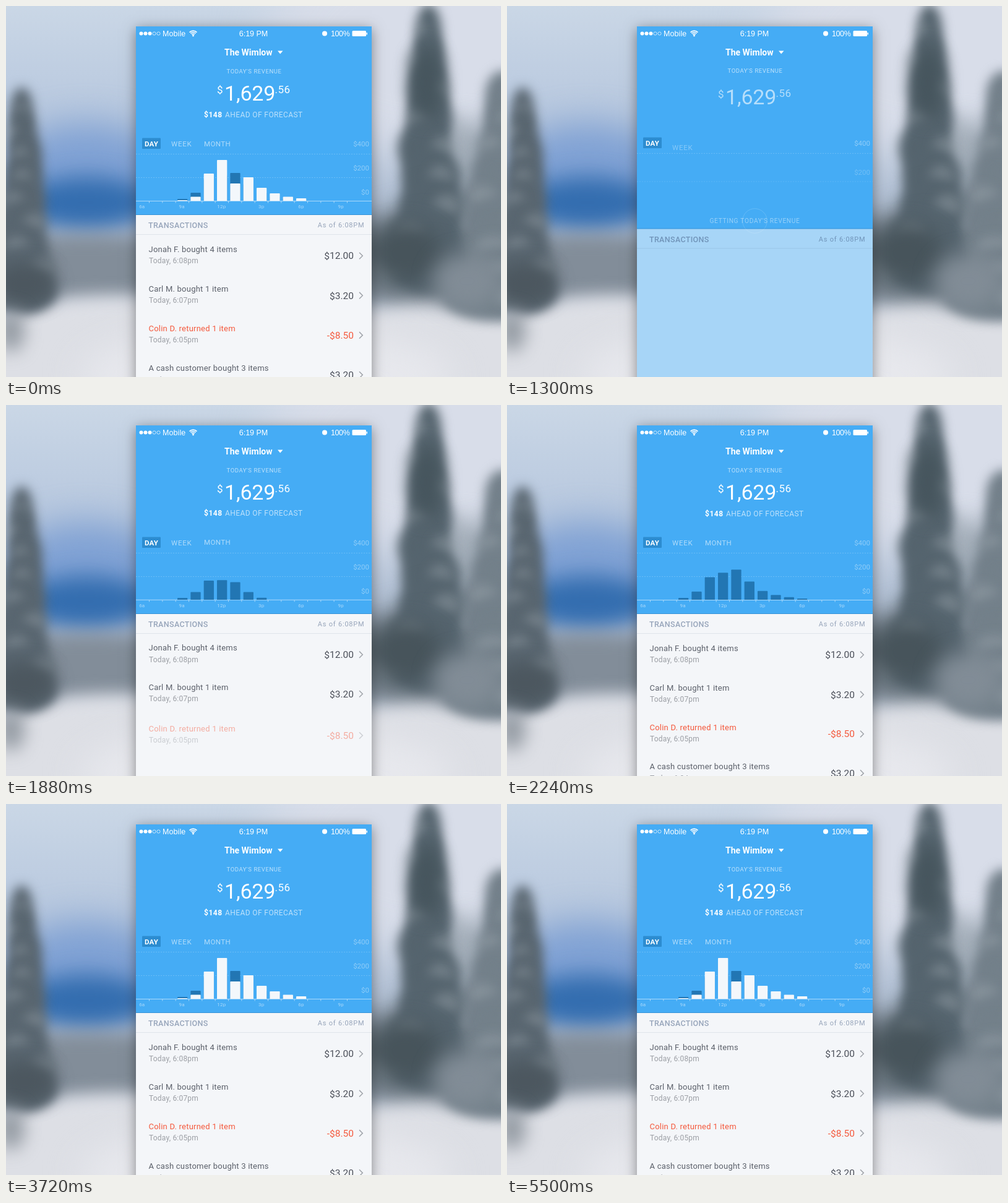
An HTML page with a canvas that plays this animation: 800x600 px, repeating every 5520 ms.

```html
<!DOCTYPE html>
<html lang="en">
<head>
<meta charset="utf-8">
<title>Revenue dashboard</title>
<style>
  html, body { margin: 0; width: 100%; height: 100%; overflow: hidden; background: #dfe2e8; }
  canvas { display: block; width: 800px; height: 600px; }
</style>
</head>
<body>
<canvas id="stage" width="800" height="600"></canvas>
<script>
const LOOP = 5520;
const BLUE = '#45acf5';
const SANS = 'Roboto, "Open Sans", sans-serif';
const SYSTEM = '"Liberation Sans", Arial, sans-serif';
const PHONE = { x: 210, y: 33, w: 381, h: 567, right: 591 };
const ctx = document.getElementById('stage').getContext('2d');

const clamp = v => Math.max(0, Math.min(1, v));
const span = (t, start, dur) => clamp((t - start) / dur);
const easeInOut = p => p * p * (3 - 2 * p);
const white = a => `rgba(255,255,255,${a})`;
function backOut(p) {
  const q = p - 1;
  return 1 + 2.7 * q * q * q + 1.7 * q * q;
}
function random(seed) {
  return () => (seed = (seed * 16807) % 2147483647) / 2147483647;
}

// Text centred vertically on y by its capital height.
function text(str, x, y, size, color, opt = {}) {
  const { weight = 400, gap = 0, align = 'left', font = SANS } = opt;
  ctx.font = `${weight} ${size}px ${font}`;
  ctx.letterSpacing = gap + 'px';
  ctx.textAlign = align;
  ctx.fillStyle = color;
  ctx.fillText(str, x, y + size * 0.355);
}

function rule(y, color, dash = []) {
  ctx.strokeStyle = color;
  ctx.lineWidth = 1;
  ctx.setLineDash(dash);
  ctx.beginPath();
  ctx.moveTo(PHONE.x, y);
  ctx.lineTo(PHONE.right, y);
  ctx.stroke();
  ctx.setLineDash([]);
}

function dot(x, y, r) {
  ctx.beginPath();
  ctx.arc(x, y, r, 0, 7);
}

function box(x, y, w, h, r) {
  ctx.beginPath();
  ctx.roundRect(x, y, w, h, r);
  ctx.fill();
}

// Springs a group up from below while it fades in.
function rise(t, start, dist, draw, fade = 3.2) {
  const p = span(t, start, 600);
  if (p <= 0) return;
  ctx.save();
  ctx.globalAlpha = clamp(p * fade);
  ctx.translate(0, dist * (1 - backOut(p)));
  draw();
  ctx.restore();
}

function makeScene() {
  const c = document.createElement('canvas');
  c.width = 800;
  c.height = 600;
  const g = c.getContext('2d');
  const rnd = random(11);

  const blob = (x, y, rx, ry, color, blur, alpha = 1) => {
    g.filter = `blur(${blur}px)`;
    g.globalAlpha = alpha;
    g.fillStyle = color;
    g.beginPath();
    g.ellipse(x, y, rx, ry, 0, 0, 7);
    g.fill();
  };
  // Tiers widen towards the base; pale flecks stand for snow on the branches.
  const fir = (x, top, base, half, color) => {
    const tiers = 9, step = (base - top) / tiers;
    for (let i = 0; i < tiers; i++) {
      const w = half * (0.3 + 0.7 * i / tiers);
      const y = top + step * (i + 0.5);
      blob(x + (rnd() - 0.5) * w * 0.3, y, w, step, color, 9);
      blob(x + (rnd() - 0.5) * w * 2, y, w * 0.4, step * 0.4, '#a3adb5', 9, 0.4);
    }
  };

  const sky = g.createLinearGradient(0, 0, 0, 460);
  sky.addColorStop(0, '#cad7e6');
  sky.addColorStop(0.35, '#b9c9df');
  sky.addColorStop(1, '#a9b6c8');
  g.fillStyle = sky;
  g.fillRect(0, 0, 800, 600);
  blob(680, 60, 260, 190, '#d8dde9', 40);
  blob(130, 270, 130, 80, '#7fa1d4', 28);
  blob(130, 318, 105, 42, '#336daf', 18);

  // Far woods, then snow that slopes down to the right
  blob(130, 425, 190, 55, '#828d99', 14);
  blob(690, 410, 150, 90, '#737f89', 18);
  blob(740, 290, 50, 110, '#98a3ad', 18, 0.8);
  blob(170, 640, 300, 172, '#dddfe5', 14);
  blob(690, 660, 330, 178, '#dddfe5', 14);
  blob(420, 600, 300, 80, '#e7e8ed', 28);

  fir(28, 150, 480, 60, '#596670');
  blob(30, 450, 50, 34, '#4c575f', 14);
  blob(8, 525, 22, 34, '#949ba3', 14);
  fir(805, 125, 490, 95, '#73808a');
  fir(680, 20, 440, 70, '#55646e');
  blob(680, 125, 26, 60, '#46555d', 14);
  blob(645, 400, 60, 48, '#47545b', 16);
  blob(745, 445, 55, 45, '#818c96', 16);

  g.filter = 'none';
  g.globalAlpha = 1;
  g.shadowColor = 'rgba(0,0,0,.42)';
  g.shadowBlur = 20;
  g.shadowOffsetY = 4;
  g.fillStyle = BLUE;
  g.fillRect(PHONE.x, PHONE.y, PHONE.w, PHONE.h + 50);
  return c;
}

function statusBar() {
  ctx.fillStyle = ctx.strokeStyle = '#fff';
  ctx.lineWidth = 0.7;
  for (let i = 0; i < 5; i++) {
    dot(218.5 + i * 7, 44.5, i < 3 ? 3 : 2.6);
    i < 3 ? ctx.fill() : ctx.stroke();
  }
  ctx.lineWidth = 1.6;
  for (let r = 3.2; r < 9; r += 2.6) {
    ctx.beginPath();
    ctx.arc(302.5, 48.5, r, -Math.PI * 0.75, -Math.PI * 0.25);
    ctx.stroke();
  }
  dot(302.5, 48, 1.4);
  ctx.fill();
  dot(515, 44.5, 4);
  ctx.fill();
  box(559.5, 40, 22.5, 9, 1.5);
  ctx.fillRect(582.5, 43, 1.5, 3.5);
  text('Mobile', 253, 44.7, 12.5, '#fff', { font: SYSTEM, gap: 0.1 });
  text('6:19 PM', 400, 44.7, 12.5, '#fff', { font: SYSTEM, align: 'center' });
  text('100%', 525, 44.7, 12.5, '#fff', { font: SYSTEM, gap: -0.4 });
}

function loader(t) {
  const out = easeInOut(span(t, 1130, 320));
  if (out >= 1) return;
  const scale = 1 - 0.2 * out;
  ctx.save();
  ctx.translate(400.5, 347.5);
  ctx.scale(scale, scale);
  ctx.globalAlpha = span(t, 40, 320) * (1 - out);
  text("GETTING TODAY'S REVENUE", 0, 0, 11.5, '#fff', { gap: 0.72, align: 'center' });
  ctx.globalAlpha = 0.5 * (1 - out);
  ctx.strokeStyle = '#d5f0ff';
  ctx.lineWidth = 1;
  ctx.beginPath();
  ctx.arc(0, 0, 22.3, -Math.PI / 2, (span(t, 200, 740) * 2 - 0.5) * Math.PI);
  ctx.stroke();
  ctx.restore();
}

// The three waves in which header, tabs and chart arrive
const wave = (t, n, draw) => rise(t, 1040 + n * 148, 20, draw);

function header(t) {
  rise(t, 950, 0, () => {
    text('The Wimlow', 353, 74.7, 14, '#fff', { weight: 700 });
    ctx.beginPath();
    ctx.moveTo(439, 72.5);
    ctx.lineTo(447.5, 72.5);
    ctx.lineTo(443.2, 77.5);
    ctx.fill();
  });
  wave(t, 0, () =>
    text("TODAY'S REVENUE", 401, 106, 9.5, white(0.66), { gap: 0.57, align: 'center' }));
  wave(t, 1, () => {
    text('$', 341, 135, 17, '#fff');
    text('1,629', 353, 140.5, 34, '#fff', { gap: -0.2 });
    text('.56', 434.5, 134.5, 17, '#fff', { gap: 0.5 });
  });
  wave(t, 2, () => {
    text('$148', 320, 175.3, 12, '#fff', { weight: 700, gap: 0.5 });
    text('AHEAD OF FORECAST', 354, 175.3, 12, white(0.64), { gap: 0.4 });
  });
}

function tabs(t) {
  const y = 222.6;
  wave(t, 0, () => {
    ctx.fillStyle = '#2c8cd0';
    box(220, 213.5, 30, 17.5, 1);
    text('DAY', 224, y, 11.5, '#fff', { weight: 700, gap: 0.2 });
  });
  wave(t, 1, () => text('WEEK', 267, y, 11.5, white(0.58), { gap: 0.7 }));
  wave(t, 2, () => text('MONTH', 320, y, 11.5, white(0.58), { gap: 0.4 }));
}

const SALES = {
  forecast: [3, 13, 35, 41, 45, 27, 13, 7, 4, 2],
  actual: [1, 6.5, 44, 66, 28, 38, 21, 12, 6.5, 4]
};
const SLOT = 21.33;

function bars(t, heights, start, color) {
  ctx.fillStyle = color;
  heights.forEach((h, i) => {
    const p = span(t, start + i * 40, 700);
    const now = Math.max(0, h * backOut(p));
    if (p > 0) box(277 + i * SLOT, 315 - now, 16.3, now, [1, 1, 0, 0]);
  });
}

function chart(t) {
  ['$400', '$200', '$0'].forEach((label, i) => wave(t, i, () => {
    text(label, 587, 222.7 + i * 39.3, 11.5, white(0.4), { align: 'right' });
    if (i < 2) rule(239.5 + i * 38, white(0.2), [2, 2]);
  }));
  wave(t, 2, () => {
    rule(315.5, white(0.55));
    ctx.fillStyle = white(0.55);
    for (let i = 0; i < 16; i++) ctx.fillRect(231 + i * SLOT, 316, 1, 2.5);
    ['6a', '9a', '12p', '3p', '6p', '9p'].forEach((label, i) =>
      text(label, 219.8 + i * 64.3, 324.5, 8, white(0.55), { align: 'center', gap: 0.2 }));
  });
  bars(t, SALES.forecast, 1600, '#2276b3');
  bars(t, SALES.actual, 2260, '#f3f7fb');
}

function panel(t) {
  const ink = 'rgba(60,85,125,.5)';
  rise(t, 1215, 50, () => {
    ctx.fillStyle = '#f4f6f9';
    ctx.fillRect(PHONE.x, 338, PHONE.w, 300);
  }, 3.9);
  rise(t, 1215, 50, () => {
    rule(337.5, 'rgba(20,90,150,.3)');
    rule(369.5, 'rgba(40,70,110,.1)');
    text('TRANSACTIONS', 230, 354.8, 12.5, ink, { weight: 500, gap: 0.35 });
    text('As of 6:08PM', 579.5, 354.5, 11, ink, { gap: 0.8, align: 'right' });
  }, 7);
}

const ROWS = [
  ['Jonah F. bought 4 items', '6:08pm', '$12.00'],
  ['Carl M. bought 1 item', '6:07pm', '$3.20'],
  ['Colin D. returned 1 item', '6:05pm', '-$8.50'],
  ['A cash customer bought 3 items', '6:04pm', '$3.20']
];

function rows(t) {
  ROWS.forEach(([title, time, price], i) => {
    const y = 393 + i * 64.2;
    const red = price[0] === '-' && '#f4593d';
    rise(t, 1380 + i * 180, 10, () => {
      text(title, 230.5, y, 13, red || '#5b606a', { gap: 0.22 });
      text('Today, ' + time, 231, y + 18.7, 12, '#9c9fa5', { gap: 0.2 });
      text(price, 562, y + 10.9, 15.5, red || '#4b4f59', { align: 'right' });
      ctx.strokeStyle = '#a1a5ab';
      ctx.lineWidth = 1.5;
      ctx.beginPath();
      ctx.moveTo(571, y + 5.7);
      ctx.lineTo(576.3, y + 11);
      ctx.lineTo(571, y + 16.3);
      ctx.stroke();
    }, 2);
  });
}

const scene = makeScene();

function draw(t) {
  ctx.drawImage(scene, 0, 0);
  ctx.save();
  ctx.beginPath();
  ctx.rect(PHONE.x, PHONE.y, PHONE.w, PHONE.h);
  ctx.clip();
  ctx.fillStyle = BLUE;
  ctx.fillRect(PHONE.x, PHONE.y, PHONE.w, PHONE.h);
  statusBar();
  header(t);
  tabs(t);
  chart(t);
  loader(t);
  panel(t);
  rows(t);
  ctx.restore();
}

function frame() {
  const t = performance.now() % LOOP;
  // The loop opens on the finished screen, then cuts to the loader.
  draw(t < 20 ? LOOP : t);
  requestAnimationFrame(frame);
}
frame();
</script>
</body>
</html>
```
